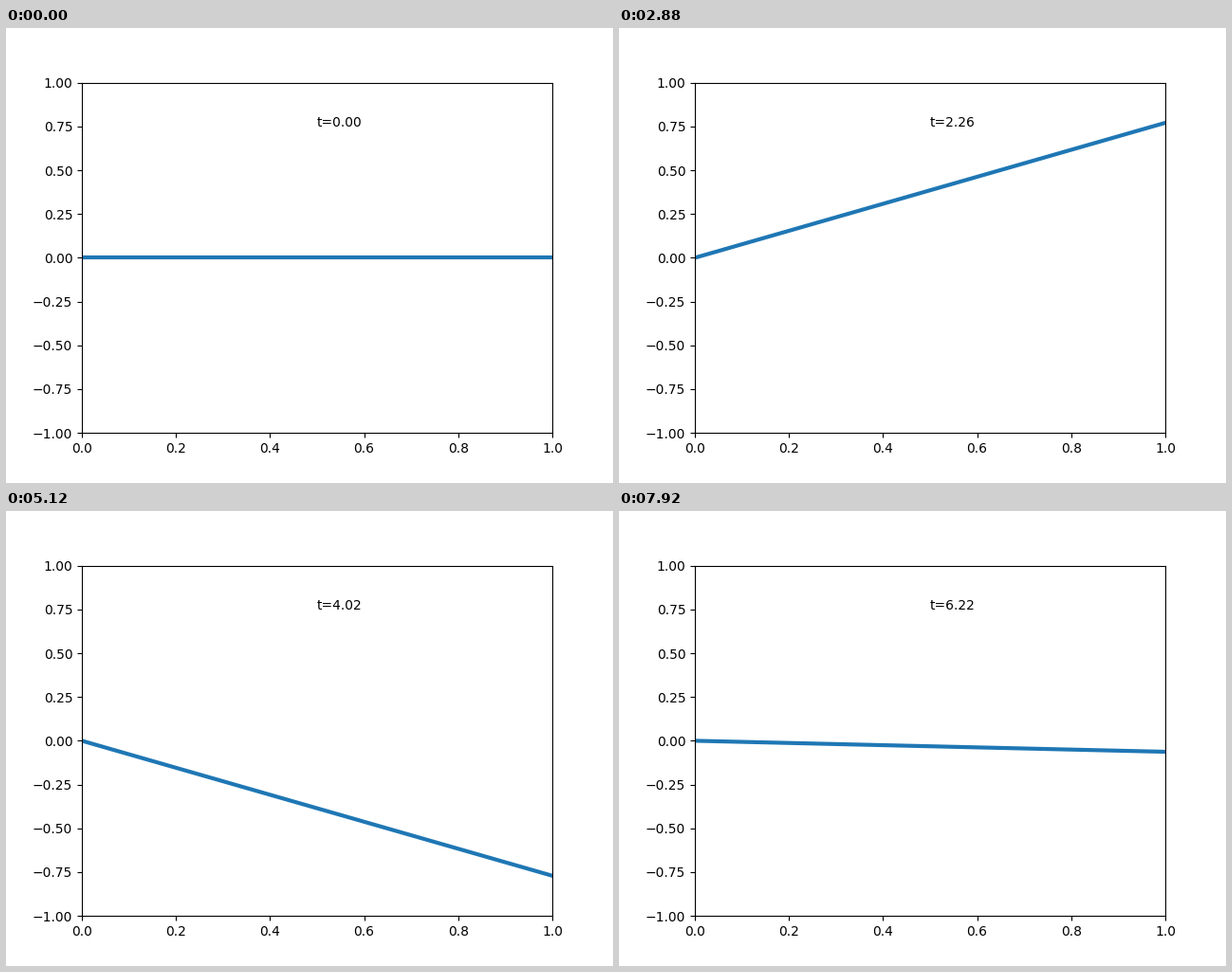
A matplotlib script that plays this animation: 640 by 480 pixels, repeating every 8000 ms.

```python
import numpy as np
import matplotlib.pyplot as plt
from matplotlib.animation import FuncAnimation

FRAMES = 100
INTERVAL = 80  # ms

fig, ax = plt.subplots(figsize=(6.4, 4.8), dpi=100)
ax.set_xlim(0, 1)
ax.set_ylim(-1, 1)

x = np.array([0.0, 1.0])
line, = ax.plot(x, 0 * x, lw=3)
label = ax.text(0.5, 0.75, "")


def update(i):
    t = 2 * np.pi * i / FRAMES
    line.set_ydata(np.sin(t) * x)
    label.set_text(f"t={t:.2f}")
    return line, label


anim = FuncAnimation(fig, update, frames=FRAMES, interval=INTERVAL,
                     repeat=True, repeat_delay=0, blit=False)
plt.show()
```
